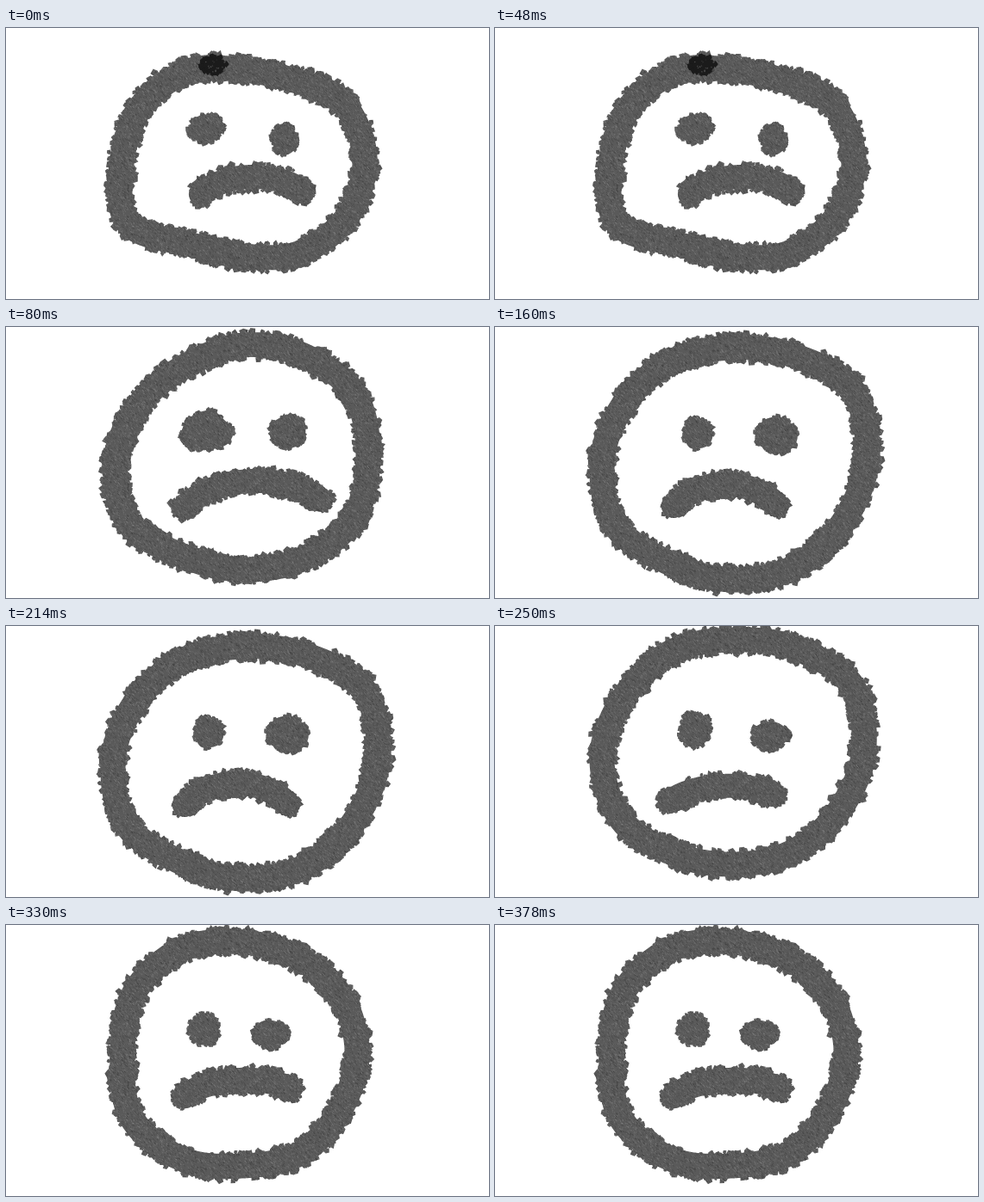
An HTML page with a canvas for the animation above (0.41 s loop, 560 by 315 pixels).

```html
<!DOCTYPE html>
<html lang="en">
<head>
<meta charset="utf-8">
<title>Sad face</title>
<style>
html, body { margin: 0; width: 100%; height: 100%; overflow: hidden; background: #fff; }
canvas { display: block; width: 560px; height: 315px; }
</style>
</head>
<body>
<canvas id="stage" width="560" height="315"></canvas>
<script>
const W = 560, H = 315, TAU = 2 * Math.PI;
const INK = '#5a5a5a', RING_WIDTH = 33, MOUTH_WIDTH = 32;
const center = { x: 275, y: 150 };
const stage = document.getElementById('stage').getContext('2d');
const drawings = [];

let seed = 7;
function rnd(a = 0, b = 1) {
  seed = (Math.imul(seed, 1664525) + 1013904223) >>> 0;
  return a + (b - a) * seed / 4294967296;
}

function layer() {
  const c = document.createElement('canvas');
  c.width = W;
  c.height = H;
  return c.getContext('2d');
}

// Fine slanted pencil grain
function makeGrain() {
  const g = layer();
  g.lineWidth = 0.7;
  for (let i = 0; i < 45000; i++) {
    const x = rnd(0, W), y = rnd(0, H), len = rnd(0.8, 2.4);
    g.strokeStyle = rnd() < 0.5 ? 'rgba(165,165,165,.34)' : 'rgba(25,25,25,.3)';
    g.beginPath();
    g.moveTo(x, y);
    g.lineTo(x + len * 0.6, y + len);
    g.stroke();
  }
  return g.canvas;
}

// Smooth closed curve through points, sampled about every 1.5 px
function smooth(keys) {
  const n = keys.length, out = [];
  keys.forEach((b, i) => {
    const a = keys[(i + n - 1) % n], c = keys[(i + 1) % n], d = keys[(i + 2) % n];
    const steps = Math.ceil(Math.hypot(c.x - b.x, c.y - b.y) / 1.5);
    const mix = (k, t) => b[k] + t / 2 * (c[k] - a[k] +
      t * (2 * a[k] - 5 * b[k] + 4 * c[k] - d[k] + t * (3 * (b[k] - c[k]) + d[k] - a[k])));
    for (let s = 0; s < steps; s++) out.push({ x: mix('x', s / steps), y: mix('y', s / steps) });
  });
  return out;
}

// Closed curve from radii at equal angles, clockwise from the right
function loopAround(o, radii, sx = 1, sy = 1) {
  return smooth(radii.map((r, i) => {
    const a = i * TAU / radii.length;
    return { x: o.x + sx * r * Math.cos(a), y: o.y + sy * r * Math.sin(a) };
  }));
}

// Arch between two ends whose middle lies at height top
function arch(x0, y0, x1, y1, top) {
  const lift = (top - (y0 + y1) / 8) * 4 / 3, steps = 90;
  return Array.from({ length: steps + 1 }, (_, i) => {
    const t = i / steps, u = 1 - t, mid = 3 * t * u;
    return {
      x: x0 + (x1 - x0) * (mid * (u / 4 + t * 3 / 4) + t * t * t),
      y: u * u * u * y0 + mid * lift + t * t * t * y1
    };
  });
}

function trace(g, pts) {
  g.beginPath();
  pts.forEach(p => g.lineTo(p.x, p.y));
}

// Small ragged flake
function chip(g, x, y, r) {
  const turn = rnd(0, TAU);
  g.beginPath();
  for (let i = 0; i < 5; i++) {
    const a = turn + i * TAU / 5, q = r * rnd(0.65, 1.3);
    g.lineTo(x + q * Math.cos(a), y + q * Math.sin(a));
  }
  g.fill();
}

function chipAt(g, p, angle, dist) {
  chip(g, p.x + dist * Math.cos(angle), p.y + dist * Math.sin(angle), rnd(2.4, 4.8));
}

function brush(g, pts, width, closed) {
  const r = width / 2 - 2, last = pts.length - 1;
  trace(g, pts);
  if (closed) g.closePath();
  g.lineWidth = 2 * r;
  g.lineCap = g.lineJoin = 'round';
  g.stroke();
  pts.forEach((p, i) => {
    const a = pts[Math.max(0, i - 1)], b = pts[Math.min(last, i + 1)];
    const dir = Math.atan2(b.y - a.y, b.x - a.x);
    for (const side of [-1, 1]) {
      if (rnd() < 0.42) chipAt(g, p, dir + side * TAU / 4, r + rnd(-2.5, 1.8));
    }
  });
  if (closed) return;
  for (const p of [pts[0], pts[last]]) {
    for (let i = 0; i < 18; i++) chipAt(g, p, i * TAU / 18, r + rnd(-3, 1));
  }
}

function blot(g, x, y, rx, ry) {
  const pts = loopAround({ x, y }, Array.from({ length: 9 }, () => rnd(0.84, 1.04)), rx, ry);
  trace(g, pts);
  g.fill();
  pts.forEach(p => {
    if (rnd() < 0.4) chip(g, p.x, p.y, rnd(1.8, 3.8));
  });
}

function smudge(g) {
  g.fillStyle = '#1b1b1b';
  blot(g, 240, 43, 16, 10);
  g.fillStyle = '#484848';
  for (let i = 0; i < 20; i++) chip(g, rnd(226, 254), rnd(35, 51), rnd(0.5, 1.3));
}

const grain = makeGrain();

function face(hold, { ring, mouth, left, right, extra }) {
  const g = layer();
  g.fillStyle = g.strokeStyle = INK;
  brush(g, loopAround(center, ring), RING_WIDTH, true);
  brush(g, arch(...mouth), MOUTH_WIDTH, false);
  blot(g, ...left);
  blot(g, ...right);
  g.globalCompositeOperation = 'source-atop';
  g.drawImage(grain, 0, 0);
  g.globalCompositeOperation = 'source-over';
  if (extra) extra(g);
  drawings.push({ hold, image: g.canvas });
}

// ring: radii; mouth: ends and top; eyes: centre and half sizes
face(80, {
  ring: [141, 139, 129, 115, 118, 154, 140, 131, 117, 101, 105, 131],
  mouth: [226, 193, 344, 190, 173],
  left: [232, 117, 21, 18],
  right: [322, 130, 16, 20],
  extra: smudge
});
face(80, {
  ring: [145, 147, 138, 132, 135, 154, 147, 133, 124, 129, 136, 148],
  mouth: [206, 210, 365, 201, 179],
  left: [233, 121, 31, 24],
  right: [328, 122, 22, 22]
});
face(90, {
  ring: [157, 150, 148, 144, 144, 158, 150, 138, 130, 126, 136, 159],
  mouth: [207, 208, 327, 207, 183],
  left: [235, 124, 19, 20],
  right: [326, 126, 25, 21]
});
face(80, {
  ring: [152, 139, 132, 127, 133, 149, 151, 142, 139, 134, 144, 161],
  mouth: [203, 204, 323, 196, 186],
  left: [232, 121, 20, 22],
  right: [320, 127, 23, 18]
});
face(80, {
  ring: [132, 130, 133, 130, 141, 149, 140, 145, 141, 130, 129, 132],
  mouth: [207, 199, 330, 190, 180],
  left: [229, 122, 20, 20],
  right: [307, 127, 21, 18]
});

const total = drawings.reduce((sum, d) => sum + d.hold, 0);
const start = performance.now();

function draw(now) {
  let t = now % total, i = 0;
  while (t >= drawings[i].hold) t -= drawings[i++].hold;
  stage.fillStyle = '#fff';
  stage.fillRect(0, 0, W, H);
  stage.drawImage(drawings[i].image, 0, 0);
}

function tick() {
  draw(performance.now() - start);
  requestAnimationFrame(tick);
}

tick();
</script>
</body>
</html>
```
